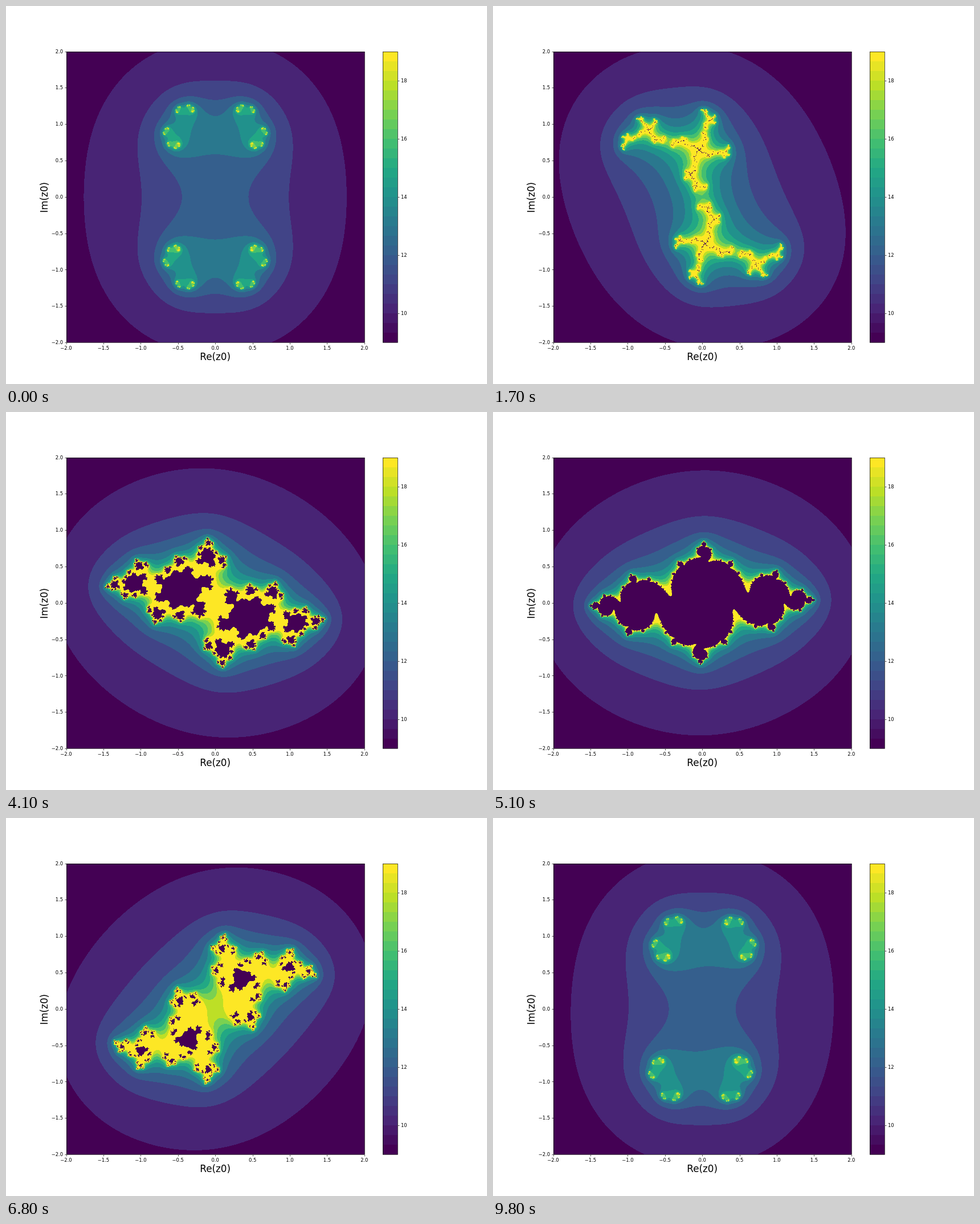
An HTML page with a canvas that plays this animation: 844 px wide and 663 px high, repeating every 9900 ms.

```html
<!DOCTYPE html>
<html lang="en">
<head>
<meta charset="utf-8">
<title>Julia sets</title>
<style>
  html, body { margin: 0; width: 100%; height: 100%; overflow: hidden; background: #fff; }
  canvas { display: block; }
</style>
</head>
<body>
<canvas id="stage" width="844" height="663"></canvas>
<script>
const ctx = document.getElementById('stage').getContext('2d');

const STEP_MS = 100, STEPS = 99;
const RADIUS = 0.7885;             // |c|, while its angle makes one full turn
const LOW = 9, HIGH = 19, MAX_COUNT = 28;
const plot = { left: 105.5, top: 79.56, width: 523.28, height: 510.51 };
const bottom = plot.top + plot.height;

const viridis = ['440154', '482475', '414487', '355f8d', '2a788e', '21918c',
                 '22a884', '44bf70', '7ad151', 'bddf26', 'fde725']
  .map(hex => [0, 2, 4].map(i => parseInt(hex.slice(i, i + 2), 16)));
const packed = viridis.map(([r, g, b]) => (255 << 24 | b << 16 | g << 8 | r) >>> 0);

function shade(t) {
  const i = Math.min(9, Math.floor(t * 10)), f = t * 10 - i;
  return `rgb(${viridis[i].map((v, k) => Math.round(v + (viridis[i + 1][k] - v) * f))})`;
}

// Iterations of z² + c until z overflows floating point.
function countSteps(x, y, cx, cy) {
  for (let n = 0; n <= MAX_COUNT; n++) {
    const re = x * x - y * y + cx;
    y = 2 * x * y + cy;
    x = re;
    if (!isFinite(x) || !isFinite(y)) return n;
  }
  return LOW;
}

const image = ctx.createImageData(523, 510);
const pixels = new Uint32Array(image.data.buffer);

function drawJulia(angle) {
  const cx = RADIUS * Math.cos(angle), cy = RADIUS * Math.sin(angle);
  let p = 0;
  for (let row = 0; row < image.height; row++) {
    const y = 2 - (row + 80.5 - plot.top) / plot.height * 4;
    for (let col = 0; col < image.width; col++) {
      const x = (col + 106.5 - plot.left) / plot.width * 4 - 2;
      const n = countSteps(x, y, cx, cy);
      pixels[p++] = packed[Math.max(LOW, Math.min(HIGH, n)) - LOW];
    }
  }
  ctx.putImageData(image, 106, 80);
  ctx.clearRect(629, 80, 1, 511);
  ctx.clearRect(106, 590, 524, 1);
  drawTicks();
  ctx.strokeRect(106.5, 80.5, 523, 510);
}

const snap = v => Math.round(v) + 0.5;

function line(x1, y1, x2, y2) {
  ctx.beginPath();
  ctx.moveTo(x1, y1);
  ctx.lineTo(x2, y2);
  ctx.stroke();
}

function text(str, x, y, align) {
  ctx.textAlign = align;
  ctx.fillText(str, x, y);
}

const tickX = i => plot.left + plot.width * i / 8;
const tickY = i => bottom - plot.height * i / 8;

function drawTicks() {
  ctx.clearRect(102, 76, 4, 519);
  ctx.clearRect(102, 591, 532, 4);
  for (let i = 0; i <= 8; i++) {
    line(snap(tickX(i)), 591, snap(tickX(i)), 593.5);
    line(103.5, snap(tickY(i)), 106, snap(tickY(i)));
  }
}

function drawLabels() {
  const bands = 30, bandHeight = plot.height / bands;
  for (let i = 0; i < bands; i++) {
    const y = Math.round(bottom - (i + 1) * bandHeight);
    ctx.fillStyle = shade(i / (bands - 1));
    ctx.fillRect(661, y, 26, Math.round(bottom - i * bandHeight) - y);
  }

  ctx.strokeStyle = ctx.fillStyle = '#000';
  ctx.lineWidth = 0.67;
  ctx.strokeRect(661.5, 80.5, 26, 510);

  ctx.font = '8.37px "DejaVu Sans", sans-serif';
  for (let i = 0; i <= 8; i++) {
    const label = (i / 2 - 2).toFixed(1).replace('-', '\u2212');
    text(label, tickX(i), 603, 'center');
    text(label, 100, Math.round(tickY(i) + 3.1), 'right');
  }
  for (let v = 10; v <= 18; v += 2) {
    const y = bottom - plot.height * (v - LOW) / (HIGH - LOW);
    line(688, snap(y), 690.5, snap(y));
    text(v, 692.9, Math.round(y + 3.1), 'left');
  }

  ctx.font = '16.75px "DejaVu Sans", sans-serif';
  text('Re(z0)', plot.left + plot.width / 2, 621, 'center');
  ctx.save();
  ctx.translate(73, plot.top + plot.height / 2 + 1);
  ctx.rotate(-Math.PI / 2);
  text('Im(z0)', 0, 0, 'center');
  ctx.restore();
}

let shown = -1;
function tick() {
  const step = Math.floor(performance.now() / STEP_MS) % STEPS;
  if (step !== shown) {
    shown = step;
    drawJulia(2 * Math.PI * step / STEPS);
  }
  requestAnimationFrame(tick);
}

drawLabels();
tick();
</script>
</body>
</html>
```
